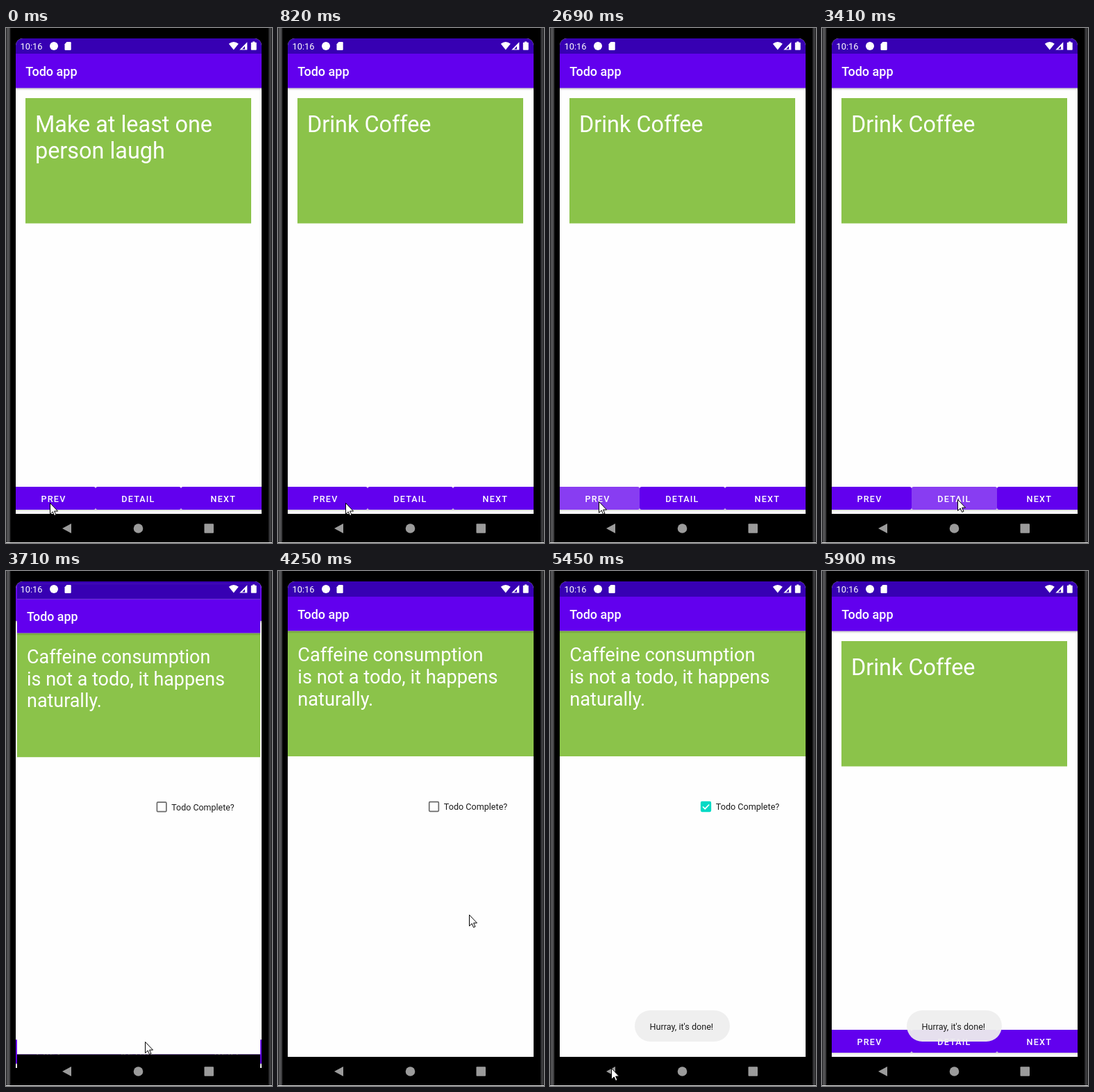
Recreate the animation shown at these times as an HTML page. Size 383 by 742 pixels, loop 6.05 s.

```html
<!DOCTYPE html>
<html lang="en">
<head>
<meta charset="utf-8">
<title>Todo app</title>
<style>
html, body { margin: 0; width: 100%; height: 100%; overflow: hidden; background: #000; }
svg { display: block; width: 383px; height: 742px; }
text { font-family: Roboto, "Noto Sans", sans-serif; font-size: 12.6px; fill: #fff; white-space: pre; }
.title { font-size: 18px; font-weight: 500; }
.card { font-size: 32.4px; }
.detail { font-size: 27.2px; }
.button { font-weight: 500; letter-spacing: 1.2px; }
.dark { fill: #1c1c1c; }
</style>
</head>
<body>
<svg viewBox="0 0 383 742">
  <defs>
    <linearGradient id="edge">
      <stop offset="0" stop-color="#1c1c1e"/><stop offset=".3" stop-color="#58585a"/>
      <stop offset=".7" stop-color="#4a4a4c"/><stop offset="1" stop-color="#000"/>
    </linearGradient>
    <linearGradient id="shade" x2="0" y2="1">
      <stop offset="0" stop-opacity=".22"/><stop offset="1" stop-opacity="0"/>
    </linearGradient>
    <clipPath id="screen"><path d="M14 742V25a10 10 0 0 1 10-10H358a10 10 0 0 1 10 10V742z"/></clipPath>
    <clipPath id="prevClip"><rect x="4" y="661" width="125" height="33" rx="3"/></clipPath>
    <clipPath id="detailClip"><rect x="129" y="661" width="123" height="33" rx="3"/></clipPath>
    <clipPath id="nextClip"><rect x="252" y="661" width="125" height="33" rx="3"/></clipPath>
    <g id="window">
      <rect x="14" y="15" width="354" height="685" fill="#fefefe"/>
      <rect x="14" y="15" width="354" height="22" fill="#3700b3"/>
      <rect x="14" y="37" width="354" height="49.5" fill="#6200ee"/>
      <rect x="14" y="700" width="354" height="42"/>
      <text class="title" x="28.3" y="69">Todo app</text>
    </g>
    <rect id="barShadow" x="14" y="86.5" width="354" height="3.5" fill="url(#shade)"/>
  </defs>

  <rect width="383" height="742"/>
  <rect width="7" height="742" fill="url(#edge)"/>
  <rect x="378" width="5" height="742" fill="#2c2c2e"/>
  <rect x="380" width="1" height="742" fill="#4a4a4c"/>

  <g clip-path="url(#screen)">
    <g id="main">
      <use href="#window"/>
      <use href="#barShadow"/>
      <rect x="28" y="101" width="325" height="180.5" fill="#8bc34a"/>
      <text class="card" id="line1" x="42" y="150"/>
      <text class="card" id="line2" x="42" y="188"/>
      <rect x="14" y="693" width="354" height="4" fill="url(#shade)"/>
      <g id="buttons"></g>
    </g>
    <g id="detail">
      <use href="#window"/>
      <rect x="14" y="86.5" width="354" height="180.5" fill="#8bc34a"/>
      <use href="#barShadow"/>
      <text class="detail" x="28.3" y="130.3">Caffeine consumption</text>
      <text class="detail" x="28.3" y="162.2">is not a todo, it happens</text>
      <text class="detail" x="28.3" y="194.1">naturally.</text>
      <circle id="halo" cx="224.5" cy="339.5" r="18" fill="#f0f0f0"/>
      <rect id="box" x="217.7" y="332.7" width="13.6" height="13.6" rx="1.2" stroke-width="1.7"/>
      <path id="tick" d="M220 339.5l3.2 3.2 6-6.2" fill="none" stroke="#fff" stroke-width="1.7"/>
      <text class="dark" x="238.8" y="344.3">Todo Complete?</text>
    </g>
  </g>

  <text x="20.5" y="31" style="font-size:12.8px">10:16</text>
  <g fill="#fff">
    <circle cx="69" cy="26" r="6"/>
    <path d="M87.5 20H92.5a1.2 1.2 0 0 1 1.2 1.2V30.8a1.2 1.2 0 0 1-1.2 1.2H85.7a1.2 1.2 0 0 1-1.2-1.2V23.2z"/>
    <path d="M320.8 22.8q7-5.6 14 0L327.8 31.5z"/>
    <path d="M336.3 31.5L347.3 20.3V31.5z"/>
    <path d="M340 30.4L344 26.2V30.4z" fill="#3700b3"/>
    <path d="M355.2 19.5h3v1.3h1.7q.8 0 .8.8V31q0 .8-.8.8h-6.3q-.8 0-.8-.8V21.600q0-.8.8-.8h1.600z"/>
  </g>
  <g fill="#9b9b9b">
    <path d="M81 721L94 714V728z"/>
    <circle cx="190.500" cy="721" r="6.8"/>
    <rect x="285.500" y="714.300" width="13.500" height="13.500" rx="1"/>
  </g>
  <g id="toast">
    <rect x="122" y="633" width="137" height="45" rx="22.500" fill="#eee" fill-opacity=".94"/>
    <text class="dark" x="143.500" y="661">Hurray, it's done!</text>
  </g>
  <rect y="741" width="383" height="1" fill="#e4e4e4"/>
  <path id="cursor" d="M.5.5V16.500L4.200 13 6.600 18.500 9 17.400 6.600 12.100H11.500z" fill="#fff" stroke="#000"/>
</svg>
<script>
const LOOP = 6050;
const $ = id => document.getElementById(id);
const clamp = v => Math.max(0, Math.min(1, v));
const show = (id, alpha) => $(id).setAttribute('opacity', +alpha);

const STEPS = [
  [0, 63, 684], [120, 63, 683],
  [430, 63, 684], [550, 63, 684], [700, 75, 684], [820, 97, 684],
  [970, 155, 685], [1090, 225, 685], [1240, 285, 685], [1360, 300, 685],
  [1510, 300, 685], [1660, 300, 685], [1810, 232, 690], [1960, 128, 691],
  [2110, 82, 687], [2260, 68, 682],
  [2540, 68, 682], [2690, 70, 682], [2810, 105, 682], [2960, 165, 680], [3110, 195, 679],
  [3410, 195, 679], [3560, 197, 678], [3710, 200, 678], [3830, 204, 676],
  [3980, 228, 645], [4100, 258, 575], [4250, 275, 495], [4370, 275, 439],
  [4520, 239, 344],
  [4790, 228, 348], [5060, 228, 348], [5180, 228, 348], [5300, 150, 560],
  [5450, 88, 716], [5600, 160, 726], [5750, 273, 735], [5900, 273, 760]
];
const PRESSES = [['prev', 430, 63], ['next', 1510, 300], ['prev', 2540, 68], ['detail', 3260, 195]];

$('buttons').innerHTML = [['prev', 4, 125, 50.5], ['detail', 129, 123, 166.3], ['next', 252, 125, 294.5]]
  .map(([name, x, width, textX]) => `
    <rect x="${x}" y="661" width="${width}" height="33" rx="3" fill="#6200ee"/>
    <g clip-path="url(#${name}Clip)"><circle id="${name}Ripple" cy="679" fill="#fff"/></g>
    <text class="button" x="${textX}" y="682.6">${name.toUpperCase()}</text>`).join('');

function scale(id, s) {
  $(id).setAttribute('transform', `translate(191 378) scale(${s}) translate(-191 -378)`);
}

function drawRipples(t) {
  for (const name of ['prev', 'detail', 'next']) show(name + 'Ripple', 0);
  for (const [name, start, x] of PRESSES) {
    const age = t - start;
    if (age < 0 || age >= 390) continue;
    const ripple = $(name + 'Ripple');
    ripple.setAttribute('cx', x);
    ripple.setAttribute('r', 40 + age * .5);
    show(name + 'Ripple', .24 * clamp((390 - age) / 190));
  }
}

function drawScreens(t) {
  const open = clamp((t - 3500) / 330), close = clamp((t - 5540) / 200);
  const opened = 1 - (1 - open) ** 2.6, closed = 1 - (1 - close) ** 2.6;
  scale('main', 1 + .054 * (opened - closed));
  scale('detail', .85 + .15 * opened - .1 * closed);
  show('main', open < 1 || close > 0);
  show('detail', clamp(open * 4) * clamp(1 - close * 1.5));
}

function draw(now) {
  const time = now % LOOP;
  const [t, x, y] = STEPS.findLast(step => step[0] <= time);
  const coffee = t >= 550 && t < 1660 || t >= 2690;
  $('line1').textContent = coffee ? 'Drink Coffee' : 'Make at least one';
  $('line2').textContent = coffee ? '' : 'person laugh';
  drawRipples(t);
  drawScreens(t);

  const checked = t >= 5180;
  $('box').setAttribute('fill', checked ? '#03dac5' : 'none');
  $('box').setAttribute('stroke', checked ? '#03dac5' : '#6b6b6b');
  show('tick', t >= 5300);
  show('halo', t >= 4790 && t < 5300);
  show('toast', clamp((t - 5165) / 190));
  $('cursor').setAttribute('transform', `translate(${x} ${y})`);
}

const begin = performance.now();
function tick() {
  draw(performance.now() - begin);
  requestAnimationFrame(tick);
}
tick();
</script>
</body>
</html>
```
